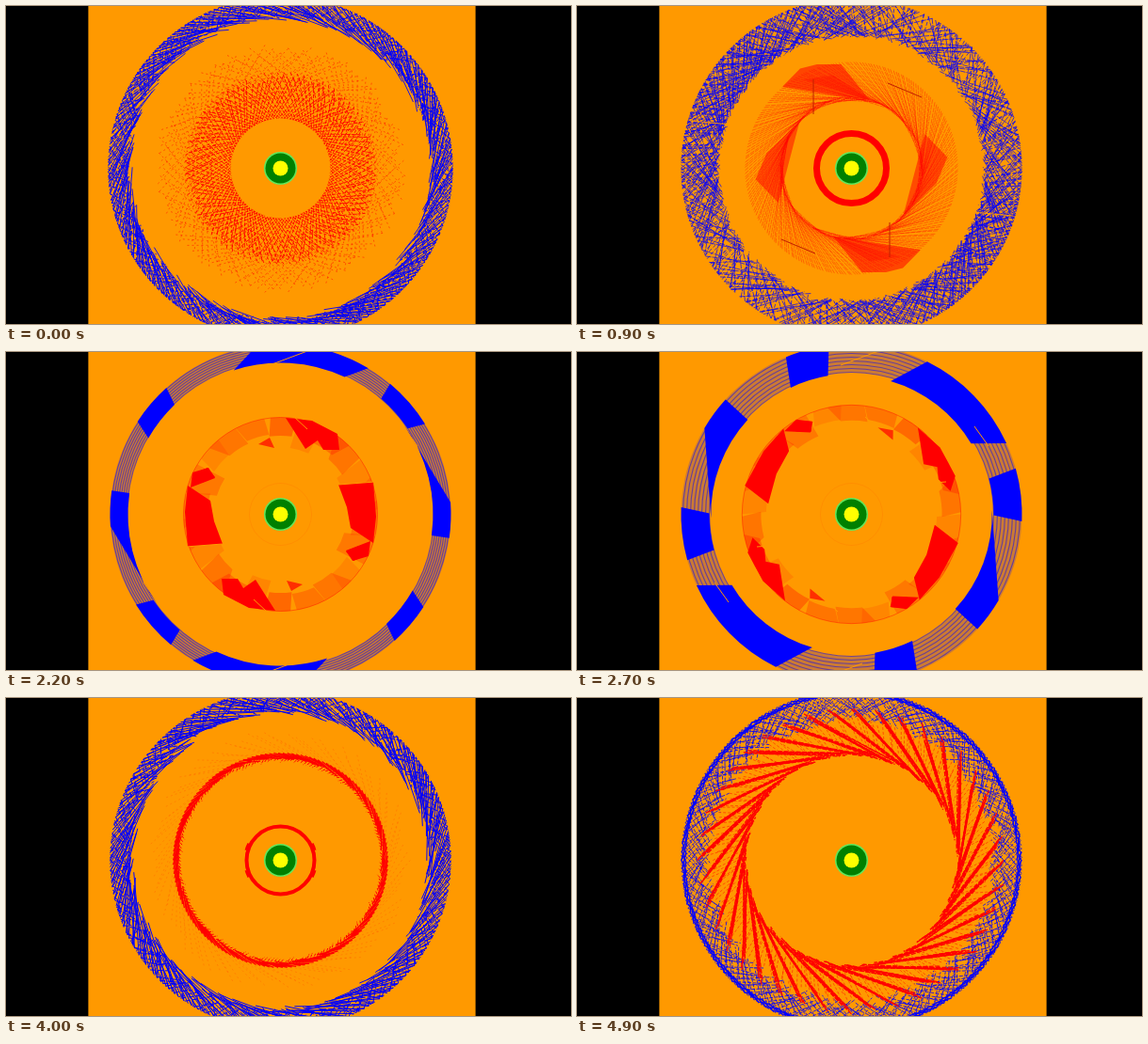
These frames come from a looping animation (600x338 px, 5000 ms). An HTML page with a canvas:

```html
<!DOCTYPE html>
<html lang="en">
<head>
<meta charset="utf-8">
<title>Spinning rings</title>
<style>
  html, body { margin: 0; width: 100%; height: 100%; overflow: hidden; background: #000; }
  canvas { display: block; width: 100vw; height: 100vh; }
</style>
</head>
<body>
<canvas id="stage" width="600" height="338"></canvas>
<script>
const ctx = document.getElementById('stage').getContext('2d');
const CX = 291.5, CY = 172.5, TAU = Math.PI * 2, DEG = Math.PI / 180;
const BLUE = '#0000ff', RED = '#ff0000', ORANGE = '#ff9900';
const LOOP = 5000, STEP = 100, COUNT = LOOP / STEP;

let seed = 1, spin = 0, from = [0, 1], to = [0, 1];

function rand() {
  seed = (seed * 16807) % 2147483647;
  return seed / 2147483647;
}
const mix = (a, b, u) => a + (b - a) * u;

// Radii are given for the key pose and carried onto the current ring.
const warp = r => to[0] + (r - from[0]) / (from[1] - from[0]) * (to[1] - to[0]);
function polar(r, a) {
  const R = warp(r);
  return [CX + R * Math.cos(a + spin), CY + R * Math.sin(a + spin)];
}

// loose and edge fray the inner and outer ends, wild shakes the angles,
// lobe thins the lines out above and below the centre.
function hatch(color, n, outer, inner, sweep, o = {}) {
  const { w = 1, alpha = 1, dash = [], loose = 0, edge = 0, wild = 0, lobe = 0 } = o;
  ctx.strokeStyle = color;
  ctx.lineWidth = w;
  ctx.globalAlpha = alpha;
  ctx.setLineDash(dash);
  ctx.beginPath();
  for (let i = 0; i < n; i++) {
    const a = (i + rand() * wild) / n * TAU;
    const turn = sweep * (1 + (rand() - .5) * Math.min(wild, 1));
    if (rand() < lobe * Math.sin(a + turn / 2) ** 2) continue;
    ctx.moveTo(...polar(outer - rand() * edge, a));
    ctx.lineTo(...polar(inner + rand() * loose, a + turn));
  }
  ctx.stroke();
  ctx.setLineDash([]);
  ctx.globalAlpha = 1;
}

function circle(color, r, w, alpha = 1) {
  ctx.globalAlpha = alpha;
  ctx.strokeStyle = color;
  ctx.lineWidth = w;
  ctx.beginPath();
  ctx.arc(CX, CY, r, 0, TAU);
  ctx.stroke();
  ctx.globalAlpha = 1;
}

function disc(color, r) {
  ctx.fillStyle = color;
  ctx.beginPath();
  ctx.arc(CX, CY, r, 0, TAU);
  ctx.fill();
}

// A part of a ring, drawn twice, half a turn apart.
function band(color, r0, r1, i0, i1, o0, o1, alpha = 1) {
  ctx.fillStyle = color;
  ctx.globalAlpha = alpha;
  for (const turn of [spin, spin + Math.PI]) {
    ctx.beginPath();
    ctx.arc(CX, CY, warp(r1), o0 * DEG + turn, o1 * DEG + turn);
    ctx.arc(CX, CY, warp(r0), i1 * DEG + turn, i0 * DEG + turn, true);
    ctx.fill();
  }
  ctx.globalAlpha = 1;
}

// A polygon in stage pixels, with its half-turn twin.
function patch(color, pts, alpha = 1) {
  ctx.fillStyle = color;
  ctx.globalAlpha = alpha;
  for (const turn of [0, Math.PI]) {
    ctx.beginPath();
    for (let i = 0; i < pts.length; i += 2) {
      const x = pts[i] - CX, y = pts[i + 1] - CY;
      ctx.lineTo(...polar(Math.hypot(x, y), Math.atan2(y, x) + turn));
    }
    ctx.fill();
  }
  ctx.globalAlpha = 1;
}

function line(color, x0, y0, x1, y1) {
  ctx.strokeStyle = color;
  ctx.lineWidth = 1;
  ctx.beginPath();
  for (const s of [1, -1]) {
    ctx.moveTo(CX + s * (x0 - CX), CY + s * (y0 - CY));
    ctx.lineTo(CX + s * (x1 - CX), CY + s * (y1 - CY));
  }
  ctx.stroke();
}

function grooves(color, r0, r1, gap, w, alpha) {
  for (let r = r0; r <= r1; r += gap) circle(color, warp(r), w, alpha);
}

// Pale facets of uneven tone around a ring.
function facets(color, r0, r1, n, lo, hi) {
  const size = 180 / n;
  for (let i = 0; i < n; i++) {
    const a = i * size, skew = (rand() - .5) * size;
    const cut = mix(r0, r1, rand() * .5);
    band(color, cut, r1, a, a + size, a + skew, a + size + skew * .5, mix(lo, hi, rand()));
  }
}

function eye(ticks) {
  circle(RED, 36, 4);
  ctx.lineWidth = 2;
  for (const d of ticks) {
    for (const turn of [0, Math.PI]) {
      ctx.beginPath();
      ctx.arc(CX, CY, 38.5, d * DEG + turn - .1, d * DEG + turn + .1);
      ctx.stroke();
    }
  }
}

const scenes = [
  { at: 0, blue: [157, 183], red: [53, 135],
    outer() {
      hatch(BLUE, 200, 183, 157, .42, { w: .9, loose: 8, wild: .5 });
      hatch(BLUE, 260, 183, 159, .2, { w: 1, dash: [5, 2], loose: 6, wild: 1 });
      hatch(BLUE, 260, 183, 160, -.12, { w: 1, dash: [3, 2], loose: 6, wild: 1 });
    },
    inner() {
      hatch(RED, 110, 101, 53, .36, { w: .9, dash: [4, 1.5], edge: 10 });
      hatch(RED, 110, 101, 53, -.36, { w: .9, dash: [4, 1.5], edge: 10 });
      hatch(RED, 90, 102, 72, .3, { w: .9, dash: [3, 2] });
      hatch(RED, 100, 133, 92, .4, { w: .8, alpha: .6, dash: [2, 3], edge: 12 });
      hatch(RED, 100, 133, 92, -.4, { w: .8, alpha: .6, dash: [2, 3], edge: 12 });
    } },
  { at: 4, blue: [138, 182], red: [40, 95],
    outer() {
      hatch(BLUE, 380, 182, 138, .3, { w: .7, loose: 6, wild: 2, lobe: .5, dash: [6, 1] });
      hatch(BLUE, 380, 182, 138, -.3, { w: .7, loose: 6, wild: 2, lobe: .5, dash: [6, 1] });
      hatch(BLUE, 340, 182, 139, .05, { w: .7, loose: 8, wild: 2, lobe: .4, dash: [4, 2] });
      line(BLUE, 358, 45, 420, 44);
      line(ORANGE, 420, 219, 463, 223);
    },
    inner() {
      hatch(RED, 230, 95, 41, .95, { w: .6, alpha: .6, wild: .5, dash: [5, 1] });
      patch(RED, [199, 147, 200, 123, 212, 112, 232, 102, 278, 134], .55);
      patch(RED, [214, 133, 236, 118, 278, 134], .3);
      patch(RED, [320, 124, 352, 120, 350, 146, 331, 178], .5);
      circle(RED, 37, 7);
      line('#c02000', 251, 78, 251, 115);
      line('#c02000', 330, 82, 366, 97);
      line(ORANGE, 318, 133, 350, 144);
    } },
  { at: 14, blue: [140, 180], red: [109, 131],
    outer() {
      hatch(BLUE, 260, 180, 171, .06, { w: 1.9, loose: 5 });
      hatch(BLUE, 260, 180, 173, -.07, { w: 1.6, loose: 4 });
      hatch(BLUE, 330, 177, 140, .12, { w: .6, loose: 28, wild: 1 });
      hatch(BLUE, 330, 177, 140, -.1, { w: .6, loose: 28, wild: 1 });
    },
    inner() {
      hatch(RED, 230, 133, 109, .3, { w: 1.4, edge: 10 });
      hatch(RED, 180, 131, 109, -.12, { w: 1, edge: 14, dash: [5, 2] });
      circle(RED, 38, .7, .35);
    } },
  { at: 22, blue: [162, 181], red: [60, 103],
    outer() {
      band(BLUE, 163, 181, 0, 180, 0, 180, .2);
      grooves(BLUE, 163, 181, 2.4, 1.1, .5);
      band(BLUE, 161, 181, -108, -65, -98, -59);
      band(BLUE, 163, 181, -49, -34, -50, -32);
      band(BLUE, 162, 181, -36, 8, -4, 8);
      band(BLUE, 162, 181, 30, 46, 33, 48);
      line(ORANGE, 280, 14, 320, -1);
      line(ORANGE, 422, 79, 437, 100);
    },
    inner() {
      facets(RED, 70, 103, 11, .08, .32);
      circle(RED, warp(103), .8, .5);
      patch(RED, [297, 70, 325, 73, 352, 87, 354, 104, 337, 104, 331, 94, 318, 103]);
      patch(RED, [353, 141, 390, 138, 393, 175, 390, 203, 366, 187, 362, 165]);
      patch(RED, [385, 217, 368, 222, 361, 211, 387, 201]);
      patch(RED, [198, 130, 214, 123, 222, 133, 208, 139]);
      patch(RED, [268, 98, 280, 91, 285, 102], .7);
      line(ORANGE, 191, 207, 230, 204);
      line(ORANGE, 306, 69, 320, 82);
      circle(RED, 33, .6, .12);
    } },
  { at: 33, blue: [134, 181], red: [108, 132],
    outer() {
      band(BLUE, 138, 181, 0, 180, 0, 180, .14);
      facets(BLUE, 138, 178, 15, .06, .25);
      grooves(BLUE, 172, 181, 2.2, .8, .6);
      band(BLUE, 171, 181, -5, 5, -23, 21);
      band(BLUE, 177, 181, -62, -48, -65, -46);
      band(BLUE, 178, 181, -108, -96, -110, -94);
    },
    inner() {
      facets(RED, 110, 130, 13, .1, .4);
      circle(RED, warp(109), .7, .5);
      circle(RED, warp(132), .7, .4);
      patch(RED, [275, 42, 297, 41, 326, 47, 369, 81, 366, 93, 350, 82, 325, 69]);
      patch(RED, [404, 109, 414, 127, 420, 160, 420, 186, 394, 216, 402, 186, 402, 158]);
      patch(RED, [395, 238, 391, 252, 370, 263, 357, 262, 373, 245]);
      patch(RED, [250, 50, 275, 45, 273, 53, 252, 57]);
      line(ORANGE, 365, 94, 386, 70);
      eye([-22, 22, -58]);
    } },
  { at: 40, blue: [155, 181], red: [105, 140],
    outer() {
      hatch(BLUE, 180, 181, 155, .43, { w: 1, loose: 7, wild: .5 });
      hatch(BLUE, 240, 181, 157, .18, { w: 1, loose: 8, dash: [8, 2], wild: 1 });
      hatch(BLUE, 200, 181, 160, -.1, { w: 1, loose: 7, wild: 1, dash: [6, 2] });
    },
    inner() {
      hatch(RED, 150, 114, 107, .24, { w: 1.3, loose: 3 });
      hatch(RED, 190, 111, 104, -.05, { w: 1, loose: 3, dash: [3, 1] });
      hatch(RED, 100, 139, 114, .3, { w: .6, alpha: .25, dash: [2, 3], edge: 12 });
      eye([-22, 22]);
    } },
  { at: 49, blue: [145, 181], red: [111, 165],
    outer() {
      hatch(BLUE, 260, 181, 146, .2, { w: .8, dash: [4, 1.5], loose: 14, wild: .3 });
      hatch(BLUE, 260, 181, 146, -.2, { w: .8, dash: [4, 1.5], loose: 14, wild: .3 });
      hatch(BLUE, 120, 181, 176, .1, { w: 1.4, edge: 2 });
      hatch(BLUE, 120, 181, 176, -.06, { w: 1.2, edge: 2 });
    },
    inner() {
      const base = spin;
      for (let i = 0; i < 8; i++) {
        spin = base + i * .013;
        hatch(RED, 40, 165 - i * 2, 111, .66, { w: 1.3, dash: [5, 1.5], loose: 4, edge: 5 });
      }
      spin = base;
      hatch(RED, 200, 156, 114, .1, { w: .7, alpha: .7, dash: [3, 2], edge: 14, loose: 12 });
    } }
];

function morph(scene, next, name, u) {
  from = scene[name];
  to = from.map((r, i) => mix(r, next[name][i], u));
}

function draw(k) {
  let i = scenes.length - 1;
  while (scenes[i].at > k) i--;
  const a = scenes[i], b = scenes[(i + 1) % scenes.length];
  const span = (b.at || COUNT) - a.at, u = (k - a.at) / span;
  const late = u > .5;
  const scene = late ? b : a, other = late ? a : b;
  const near = late ? 1 - u : u;

  ctx.fillStyle = ORANGE;
  ctx.fillRect(0, 0, 600, 338);
  spin = (late ? u - 1 : u) * span * .12;
  seed = 97 + scene.at * 31;
  morph(scene, other, 'blue', near);
  scene.outer();
  morph(scene, other, 'red', near);
  scene.inner();

  disc('#62e65a', 17.6);
  disc('#008000', 16);
  disc('#ffff00', 8);
  ctx.fillStyle = '#000';
  ctx.fillRect(0, 0, 87.4, 338);
  ctx.fillRect(498.6, 0, 102, 338);
}

const start = performance.now();
let shown = -1;
function tick() {
  const k = Math.floor((performance.now() - start) % LOOP / STEP);
  if (k !== shown) draw(shown = k);
  requestAnimationFrame(tick);
}
tick();
</script>
</body>
</html>
```
